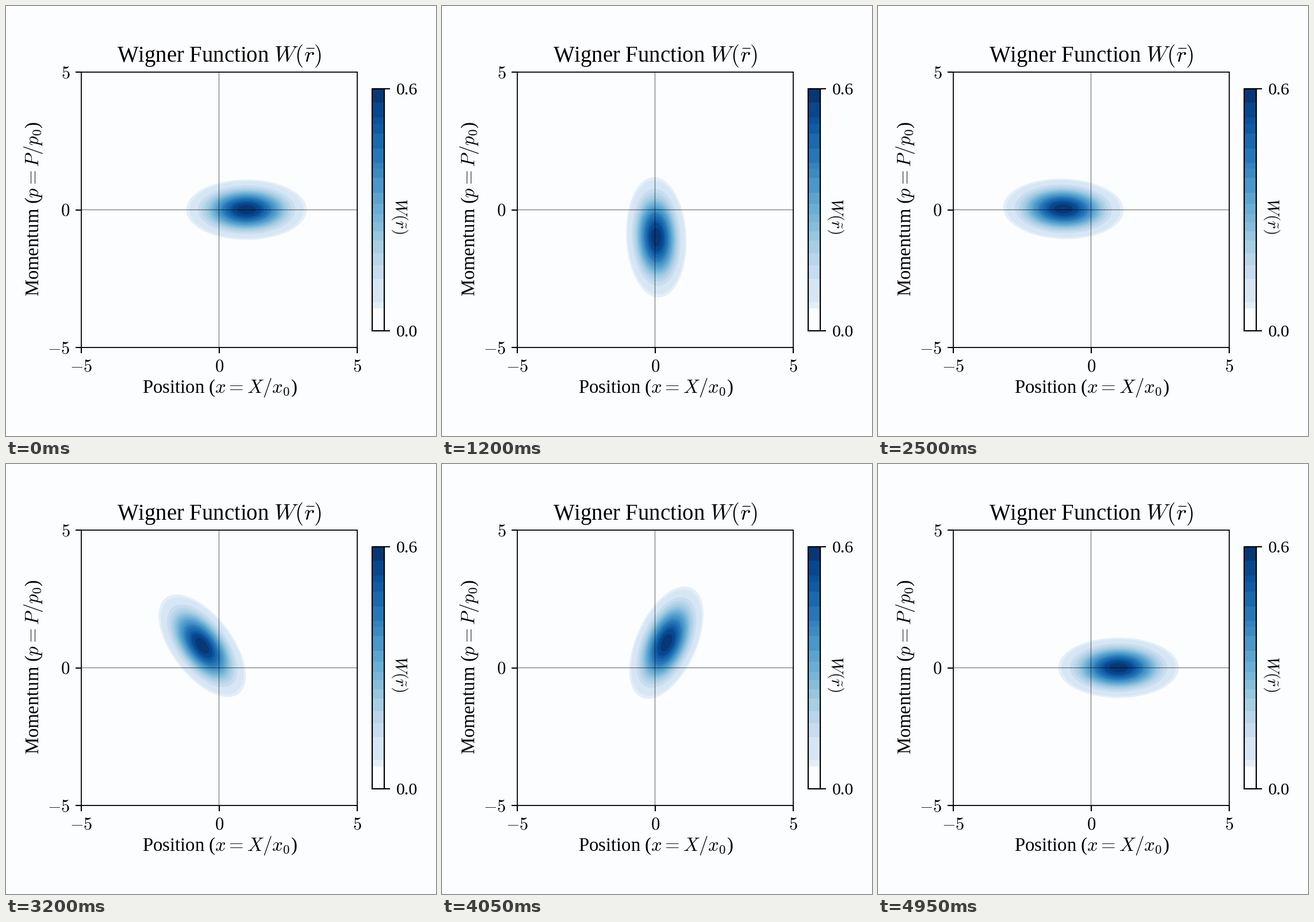
A matplotlib script for the animation above (5000 ms loop, 748 px wide and 748 px high).

```python
import numpy as np
import matplotlib as mpl
import matplotlib.pyplot as plt
from matplotlib.animation import FuncAnimation
from matplotlib.patches import Ellipse, Rectangle

SIZE, DPI = 748, 187
FRAMES, INTERVAL = 100, 50
BG = "#fcfdff"
LEFT, RIGHT, TOP, BOTTOM = 131, 611, 115, 594
CX, CY, UNIT = 370.4, 354.4, 48      # plot origin and pixels per unit
BAR_X, BAR_W, BAR_TOP, BAR_H = 637, 21, 144, 421

mpl.rcParams["font.family"] = "Liberation Serif"
mpl.rcParams["mathtext.fontset"] = "cm"

# Lower edges of the colour bands, as fractions of the peak value
EDGES = np.array([0.0924, 0.118, 0.213, 0.270, 0.320, 0.372, 0.412,
                  0.450, 0.483, 0.524, 0.569, 0.633, 0.671, 0.694,
                  0.754, 0.815, 0.856, 0.882, 0.943])
UPPER = np.append(EDGES[1:], 1.0)
COLORS = plt.get_cmap("Blues")((EDGES + UPPER) / 2)


def pt(px):
    return px * 72 / DPI


fig = plt.figure(figsize=(SIZE / DPI, SIZE / DPI), dpi=DPI, facecolor=BG)
ax = fig.add_axes([0, 0, 1, 1])
ax.set(xlim=(0, SIZE), ylim=(SIZE, 0))
ax.axis("off")


def line(x0, y0, x1, y1, width, **kw):
    ax.plot([x0, x1], [y0, y1], color="black", lw=pt(width),
            solid_capstyle="butt", **kw)


def frame_box(x, y, w, h, width):
    ax.add_patch(Rectangle((x, y), w, h, fill=False, ec="black",
                           lw=pt(width), joinstyle="miter", zorder=4))


def label(x, y, text, size, ha="center", rotation=0):
    ax.text(x, y, text, fontsize=pt(size), ha=ha, va="baseline",
            rotation=rotation, rotation_mode="anchor")


# Gaussian level sets: value = peak * exp(-x^2/2 - 2 p^2)
ellipses = []
for edge, color in zip(EDGES, COLORS):
    r = UNIT * np.sqrt(-2 * np.log(edge))
    e = Ellipse((CX, CY), 2 * r, r, fc=color, ec="none", zorder=1)
    ellipses.append(ax.add_patch(e))

# Plot frame, cross lines and ticks
line(CX, TOP, CX, BOTTOM, 1.3, alpha=0.5, zorder=3)
line(LEFT, CY, RIGHT, CY, 1.3, alpha=0.5, zorder=3)
frame_box(LEFT, TOP, RIGHT - LEFT, BOTTOM - TOP, 1.8)
for v, x, y in zip((-5, 0, 5), np.linspace(LEFT, RIGHT, 3),
                   np.linspace(BOTTOM, TOP, 3)):
    line(x, BOTTOM, x, BOTTOM + 10, 2.1, zorder=4)
    line(LEFT - 10, y, LEFT, y, 2.1, zorder=4)
    label(x, 636, f"${v}$", 30.5)
    label(111.5, y + 10.2, f"${v}$", 30.5, ha="right")

# Colour bar
for low, high, color in zip(EDGES, UPPER, COLORS):
    top = BAR_TOP + BAR_H * (1 - high)
    ax.add_patch(Rectangle((BAR_X, top), BAR_W, BAR_H * (high - low),
                           fc=color, ec="none", antialiased=False))
frame_box(BAR_X, BAR_TOP, BAR_W, BAR_H, 2.2)
for y, text in ((BAR_TOP, "0.6"), (BAR_TOP + BAR_H, "0.0")):
    line(BAR_X + BAR_W, y, BAR_X + BAR_W + 10, y, 2.1, zorder=4)
    label(679, y + 9.7, text, 30, ha="left")

label(371, 97, r"Wigner Function $W(\bar{r})$", 38.8)
label(371.5, 673, "Position ($x=X/x_0$)", 32.8)
label(57, 353, "Momentum ($p=P/p_0$)", 32.8, rotation=90)
label(677, 365, r"$W(\tilde{r})$", 29.2, rotation=-90)


def update(i):
    theta = 2 * np.pi * i / (FRAMES - 1)
    center = (CX + UNIT * np.cos(theta), CY + UNIT * np.sin(theta))
    for e in ellipses:
        e.set_center(center)
        e.set_angle(np.degrees(theta))
    return ellipses


anim = FuncAnimation(fig, update, frames=FRAMES, interval=INTERVAL,
                     repeat=True, repeat_delay=0, blit=False)
plt.show()
```
